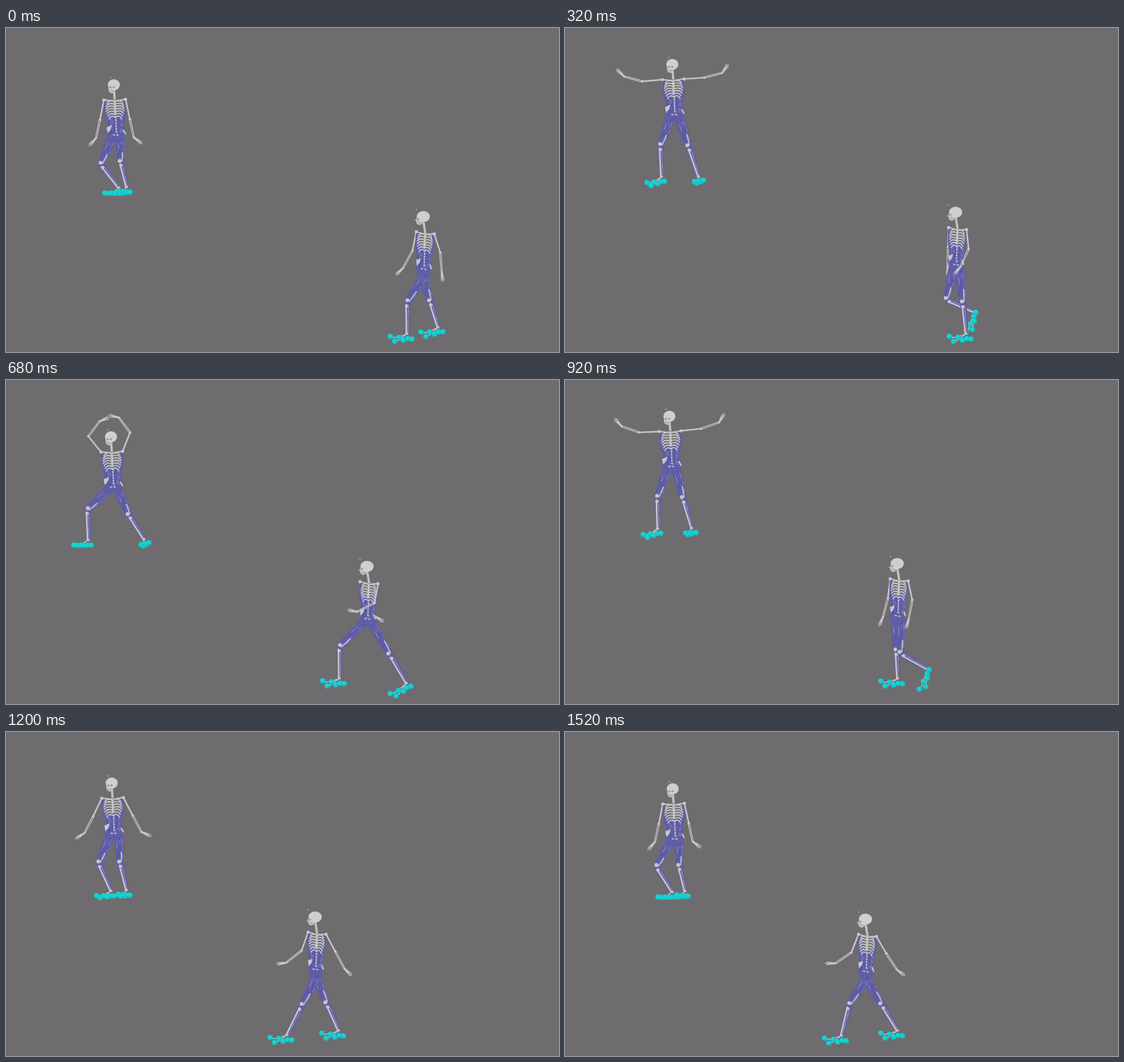
Recreate the animation shown at these times as an HTML page. Size 767x450 px, loop 1.56 s.

```html
<!DOCTYPE html>
<html lang="en">
<head>
<meta charset="utf-8">
<title>Jumping and walking skeletons</title>
<style>
html, body { margin: 0; width: 100%; height: 100%; overflow: hidden; background: #6e6c6e; }
svg { display: block; width: 100vw; height: 100vh; }
</style>
</head>
<body>
<svg viewBox="0 0 767 450"><g id="scene" stroke-linecap="round" stroke-linejoin="round"></g></svg>
<script>
const LOOP = 1560, STEP = 40;
const BONE = '#c8c7c9', SHADE = '#98969b', BLUE = '#605ea7', DEEP = '#504e9a', PALE = '#8b89b8';
const { sin, cos, PI, hypot, sqrt, max, exp } = Math;

// ---------- helpers ----------
const clamp = v => Math.min(1, max(0, v));
const smooth = u => u * u * (3 - 2 * u);
const mix = (a, b, u) => a + (b - a) * u;
const rad = deg => deg * PI / 180;
const shift = (p, x, y) => [p[0] + x, p[1] + y];

// Point at share k from a to b, pushed s pixels sideways.
function at(a, b, k, s = 0) {
  const dx = b[0] - a[0], dy = b[1] - a[1], len = hypot(dx, dy) || 1;
  return [a[0] + dx * k - dy / len * s, a[1] + dy * k + dx / len * s];
}

// Monotone cubic through key rows [time, ...values].
function curve(keys, t) {
  const last = keys.length - 1;
  let i = 0;
  while (i < last - 1 && t >= keys[i + 1][0]) i++;
  const h = keys[i + 1][0] - keys[i][0], u = (t - keys[i][0]) / h, w = 1 - u;
  return keys[0].slice(1).map((_, n) => {
    const c = n + 1;
    const slope = k => (keys[k + 1][c] - keys[k][c]) / (keys[k + 1][0] - keys[k][0]);
    const tangent = k => {
      if (k === 0 || k === last) return slope(k && last - 1);
      const a = slope(k - 1), b = slope(k);
      return a * b <= 0 ? 0 : 2 * a * b / (a + b);
    };
    return mix(keys[i][c], keys[i + 1][c], smooth(u)) + h * u * w * (tangent(i) * w - tangent(i + 1) * u);
  });
}

// Chain of segments; angles in degrees from straight down, side -1 opens to the left.
function chain(p, side, angles, lengths) {
  const pts = [p];
  angles.forEach((a, i) => pts.push(shift(pts[i], side * sin(rad(a)) * lengths[i], cos(rad(a)) * lengths[i])));
  return pts;
}

// Knee of a leg with equal halves of the given length.
function bendKnee(hip, ankle, half, amount, share = .5) {
  const d = hypot(ankle[0] - hip[0], ankle[1] - hip[1]) / 2;
  return at(hip, ankle, share, amount * sqrt(max(0, half * half - d * d)));
}

function foot(x, y, half, pitch, width, share) {
  const dx = cos(rad(pitch)) * half, dy = sin(rad(pitch)) * half;
  const toe = [x - dx, y - dy], heel = [x + dx, y + dy];
  return { toe, heel, width, ankle: shift(at(toe, heel, share), 0, -7) };
}

// ---------- drawing ----------
const f = n => n.toFixed(1);
const pt = p => f(p[0]) + ' ' + f(p[1]);
const stroke = (d, c, w, dash = '') =>
  `<path d="${d}" fill="none" stroke="${c}" stroke-width="${w}" ${dash && `stroke-dasharray="${dash}"`}/>`;
const line = (pts, c, w, dash) => stroke('M' + pts.map(pt).join('L'), c, w, dash);
const shape = (pts, c) => `<path d="M${pts.map(pt).join('L')}Z" fill="${c}"/>`;
const oval = (p, rx, ry, c) => `<ellipse cx="${f(p[0])}" cy="${f(p[1])}" rx="${rx}" ry="${ry}" fill="${c}"/>`;
const dot = (p, r, c) => oval(p, r, r, c);
const noise = i => { const v = sin(i * 91.7 + 4) * 4373.1; return v - Math.floor(v); };

function muscle(a, b, wa, wb) {
  const bulge = (wa + wb) * .56;
  return `<path d="M${pt(at(a, b, 0, wa))}Q${pt(at(a, b, .45, bulge))} ${pt(at(a, b, 1, wb))}`
    + `L${pt(at(a, b, 1, -wb))}Q${pt(at(a, b, .45, -bulge))} ${pt(at(a, b, 0, -wa))}Z" fill="${BLUE}"/>`;
}

// Fibres scattered along a muscle.
function fibres(a, b, width, count) {
  let out = '';
  for (let i = 0; i < count; i++) {
    const k = noise(i) * .85, s = (noise(i + 50) - .5) * width;
    out += line([at(a, b, k, s), at(a, b, k + .12, s * .95)], i % 2 ? PALE : DEEP, .8);
  }
  return out;
}

function drawArm([s, e, w, tip]) {
  let out = line([s, e], BONE, 2.1);
  for (const k of [-1, 1]) out += line([at(e, w, .03, k), at(e, w, 1, k * .8)], BONE, 1.1);
  out += dot(s, 2.2, BONE) + dot(e, 1.8, BONE) + line([w, at(w, tip, .5)], BONE, 2.8);
  for (const k of [-2, 0, 1.8]) out += line([at(w, tip, .3, k * .5), at(w, tip, k ? .85 : 1, k)], BONE, 1.1);
  return out;
}

function drawLeg(hip, knee, ankle) {
  let out = muscle(hip, knee, 6.8, 4.6) + muscle(at(knee, ankle, 0, -.5), at(knee, ankle, 1, -.5), 4.5, 2.7);
  out += fibres(hip, knee, 10, 22) + fibres(knee, ankle, 5, 8);
  out += line([at(hip, knee, .62, -2.8), at(hip, knee, .95, -2)], BONE, 1.5);
  out += line([at(knee, ankle, .08, 1.4), at(knee, ankle, 1, .8)], BONE, 2.2);
  out += line([at(knee, ankle, .1, -1.8), at(knee, ankle, 1, -1.4)], SHADE, 1);
  return out + dot(at(hip, knee, .95, 1.2), 2.7, BONE) + dot(at(knee, ankle, .12, .5), 2.3, BONE) + dot(ankle, 2, BONE);
}

function drawFoot({ toe, heel, width, ankle }) {
  let out = shape([ankle, at(toe, heel, .1), at(toe, heel, .9)], DEEP);
  for (const s of [-.6, .6]) out += line([ankle, at(toe, heel, .35, s * width), at(toe, heel, .1, s * width)], BONE, 1.3);
  for (let i = 0; i < 6; i++) {
    const k = i / 5, p = at(toe, heel, k, (i % 2 ? 1 : -1) * (1 - k) * width);
    out += dot(p, 3.8, '#12c3c4') + dot(shift(p, -.5, -.7), 2.5, '#1ad3d2');
  }
  return out;
}

function drawTorso(l, r, p) {
  const mid = at(l, r, .5);
  const q = (u, v) => [mid[0] + (p[0] - mid[0]) * v + (r[0] - l[0]) * u,
                       mid[1] + (p[1] - mid[1]) * v + (r[1] - l[1]) * u];
  let out = shape([q(-.4, .4), q(.42, .4), q(.38, .68), q(.46, .95), q(.34, 1.16),
                   q(-.3, 1.16), q(-.46, .95), q(-.38, .7)], BLUE);
  for (const s of [-1, 1]) out += line([q(s * .44, .08), q(s * .42, .4), q(s * .36, .6)], BLUE, 4);
  out += fibres(q(0, .4), q(0, 1.1), 20, 26);
  for (let i = 0; i < 7; i++) {
    const v = .04 + i * .075, u = .32 + .1 * sin((i + 1) * .5);
    for (const s of [-1, 1])
      out += stroke(`M${pt(q(0, v + .02))}Q${pt(q(s * u * .7, v - .05))} ${pt(q(s * u, v + .07))}`, BONE, 1.6);
  }
  out += line([q(0, 0), q(0, .42)], BONE, 2.6) + line([q(.02, .5), q(.03, .95)], BONE, 1.8, '1.5 2.5');
  out += shape([q(-.42, .8), q(-.16, .74), q(-.24, .88), q(-.38, .97)], BONE);
  out += line([q(.36, .9), q(.44, 1)], BONE, 2) + line([q(-.12, 1.03), q(.2, 1.04)], BONE, 1.6, '2 3');
  return out + line([l, q(-.12, .03), q(.12, .03), r], BONE, 1.8);
}

function drawHead(h, neck, profile) {
  const x = profile ? -4.6 : -2;
  let out = line([shift(h, 1, 6), neck], SHADE, 3.6) + line([shift(h, 1, 6), neck], BONE, 2.6, '1.5 2');
  out += oval(shift(h, x, 4.6), 4.9, 6.2, '#c0bfc0');
  out += oval(shift(h, .8, -1.2), profile ? 9.2 : 8.4, 7.6, '#d0cfd0');
  out += oval(shift(h, x - 1.8, 2.4), 1.6, 1.4, SHADE);
  if (!profile) out += oval(shift(h, x + 2.6, 2.2), 1.6, 1.4, SHADE);
  out += line([shift(h, x - 1.5, 7.5), shift(h, x + 2, 7.5)], SHADE, .8);
  return out + dot(shift(h, profile ? -9 : -4, -11), 1, '#aaa8aa')
    + (profile ? dot(shift(h, -10.5, 4), .9, '#aaa8aa') : '');
}

function drawFigure({ head, shoulders, pelvis, arms, legs, profile }) {
  return drawArm(arms[0])
    + legs.map(l => drawLeg(l.hip, l.knee, l.foot.ankle) + drawFoot(l.foot)).join('')
    + drawTorso(...shoulders, pelvis) + drawHead(head, at(...shoulders, .5), profile) + drawArm(arms[1]);
}

// ---------- jumping jack ----------
// Phase 0 to 1 opens the jump, 1 to 2 closes it with a quick start.
const phase = t => t < 680 ? t / 680 : 1 + clamp((t - 680) / 720) ** .6;
const openness = t => (1 - cos(PI * phase(t))) / 2;

function jumper(t) {
  const open = openness(t), lift = sin(PI * phase(t)) ** 2, air = lift * lift;
  const head = [146.5 + 2.5 * cos(2 * PI * (t - 100) / LOOP), 80 - 28.5 * lift];
  const shoulders = [shift(head, -13, 20), shift(head, 17, 19)], pelvis = shift(head, 3.5, 67);
  const raise = 12 + 205 * open, upper = raise - raise * raise / 700;
  const arms = [-1, 1].map((side, i) =>
    chain(shoulders[i], side, [upper + side * raise * .04, raise, raise + 35 + side * 5], [28, 26, 15]));

  const wide = clamp(open / .83), wideRight = clamp(openness(t + 80) / .83);
  const feet = [
    foot(149 - 8 * clamp(t / 700) - 35 * wide, 229.5 - 14.5 * air, 12, -11 * lift, .4 + 2.5 * sqrt(lift), .82),
    foot(163 + 30 * wideRight, 228 - 15 * air, 8 - 2.5 * wideRight, -20 * wideRight, 1.5, .7 - .35 * wideRight)
  ];
  const legs = feet.map((foot, i) => {
    const hip = shift(pelvis, i ? 6 : -5, 4);
    return { hip, foot, knee: bendKnee(hip, foot.ankle, 43.5, i ? .15 : .85) };
  });
  return { head, shoulders, pelvis, arms, legs };
}

// ---------- walk ----------
// time, head x, head y, arm swing
const WALK = [[0, 578, 263, .4], [320, 541, 257, -.2], [480, 523, 255, -.5], [680, 500, 260, -1],
  [920, 460, 256, .1], [1200, 428, 258, .9], [1520, 416, 261, 1]];
const STRIDES = [
  { start: 170, time: 540, from: [591, 424], to: [453, 422], hip: -3 },
  { start: 740, time: 520, from: [548, 432], to: [375, 429], hip: 5 }
];

function stride(s, pelvis, t) {
  const raw = (t - s.start) / s.time, u = clamp(raw), move = smooth(u);
  // The heel peels off slowly and the toe snaps back up.
  const late = t - s.start - 165, pitch = -72 * exp(-((late / (late < 0 ? 160 : 80)) ** 2) / 2);
  const x = mix(s.from[0], s.to[0], move), y = mix(s.from[1], s.to[1], move) - 100 * u * (1 - u) ** 2;
  const step = foot(x, y, 15, pitch, 3.8, .77), hip = shift(pelvis, s.hip, 5);
  const swing = sqrt(max(0, sin(PI * clamp((raw + .2) / 1.4)))), ahead = clamp((hip[0] - step.ankle[0]) / 20);
  return { hip, foot: step, knee: bendKnee(hip, step.ankle, 48, .9 * max(swing, ahead), .54) };
}

function walker(t) {
  const [x, y, swing] = curve(WALK, t), head = [x, y];
  const shoulders = [shift(head, -9, 20), shift(head, 16, 23)], pelvis = shift(head, 1, 70);
  const reach = [10 + 46 * swing, 15 - 48 * swing], upper = [5 + 16 * swing, -10 - 20 * swing];
  const arms = shoulders.map((s, i) => chain(s, -1, [upper[i], reach[i], reach[i] * 1.6], [27, 27, 14]));
  return { head, shoulders, pelvis, arms, legs: STRIDES.map(s => stride(s, pelvis, t)), profile: true };
}

// ---------- loop ----------
const scene = document.getElementById('scene');
const start = performance.now();
let shown = -1;
function render() {
  const t = Math.floor((performance.now() - start) % LOOP / STEP) * STEP;
  if (t !== shown) {
    shown = t;
    scene.innerHTML = drawFigure(jumper(t)) + drawFigure(walker(t));
  }
  requestAnimationFrame(render);
}
render();
</script>
</body>
</html>
```
